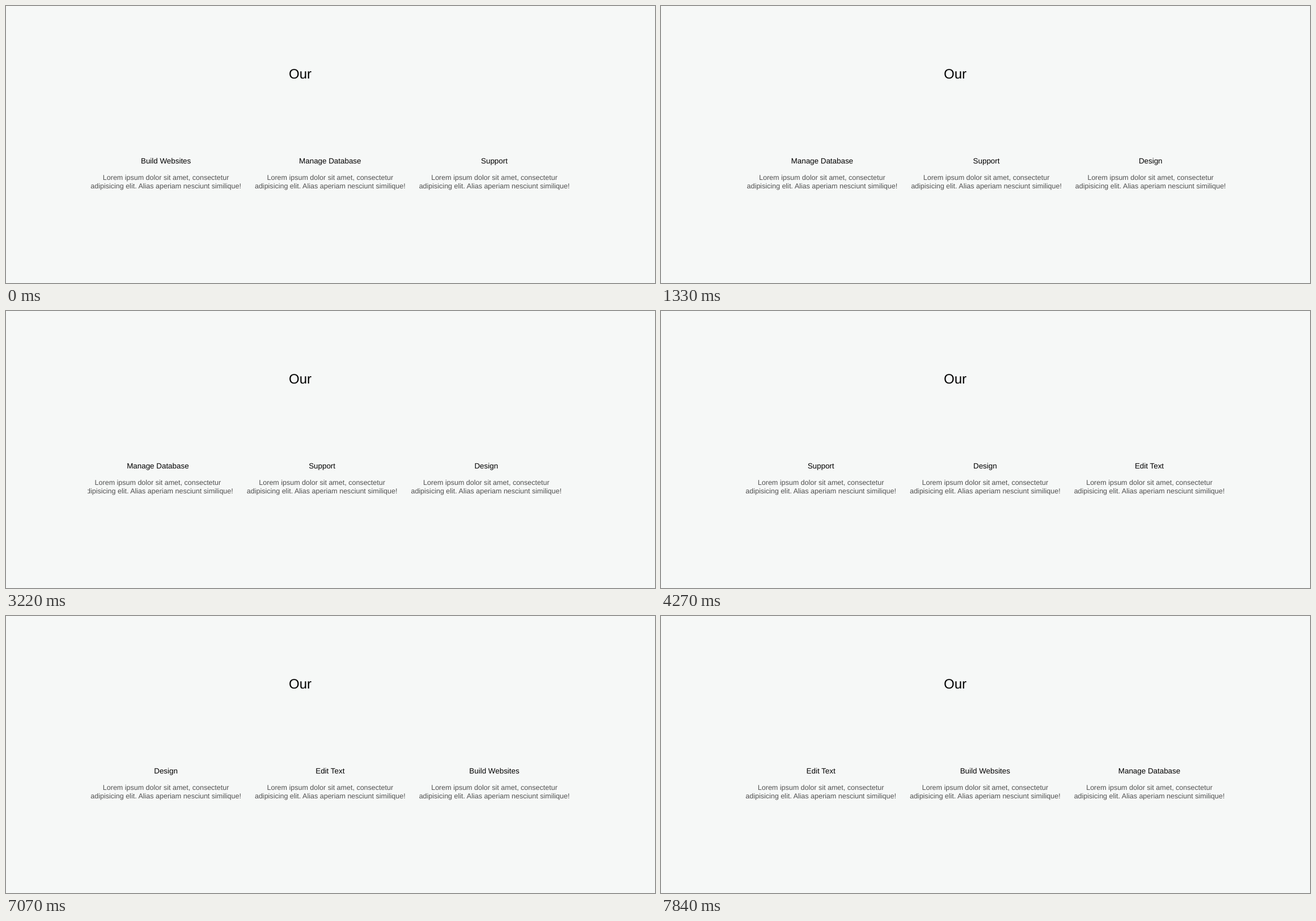
Animation of 1145x489 px, one loop 7.91 s. Source, as an HTML page:

```html
<!DOCTYPE html>
<html lang="en">
<head>
<meta charset="utf-8">
<title>Services carousel</title>
<style>
  html, body { margin: 0; width: 100%; height: 100%; overflow: hidden; background: #f6f8f7; }
  svg { display: block; }
  text { font-family: "Liberation Sans", Arial, sans-serif; text-rendering: geometricPrecision; }
  .heading { font-size: 24px; }
  .card { text-anchor: middle; }
  .title { font-size: 13.4px; }
  .body { font-size: 12.52px; fill: #505050; }
</style>
</head>
<body>
<svg width="1145" height="489" viewBox="0 0 1145 489">
  <clipPath id="viewport"><rect x="144" y="250" width="855" height="90"/></clipPath>
  <text class="heading" x="499" y="127.5">Our</text>
  <g clip-path="url(#viewport)"><g id="track"></g></g>
</svg>
<script>
const LOOP = 7910, TICK = 70;
const STEP = 289.7, FIRST_CENTER = 282.1;
const FIRST_SLIDE = 1101, PERIOD = 2102, DURATION = 259, SLIDES = 4;
const TITLES = ["Build Websites", "Manage Database", "Support", "Design", "Edit Text"];
const LINES = [
  "Lorem ipsum dolor sit amet, consectetur",
  "adipisicing elit. Alias aperiam nesciunt similique!"
];

const track = document.getElementById("track");

function addText(parent, className, y, content) {
  const text = document.createElementNS("http://www.w3.org/2000/svg", "text");
  text.setAttribute("class", className);
  text.setAttribute("y", y);
  text.textContent = content;
  parent.append(text);
}

for (let i = 0; i < SLIDES + 3; i++) {
  const card = document.createElementNS("http://www.w3.org/2000/svg", "g");
  card.setAttribute("class", "card");
  card.setAttribute("transform", `translate(${FIRST_CENTER + i * STEP} 0)`);
  addText(card, "title", 277.5, TITLES[i % TITLES.length]);
  LINES.forEach((line, row) => addText(card, "body", 307 + row * 15, line));
  track.append(card);
}

// CSS "ease": cubic-bezier(.25, .1, .25, 1), solved for x by bisection.
function ease(x) {
  if (x <= 0) return 0;
  if (x >= 1) return 1;
  const bezier = (a, b, t) => 3 * a * t * (1 - t) ** 2 + 3 * b * t * t * (1 - t) + t ** 3;
  let low = 0, high = 1;
  for (let i = 0; i < 24; i++) {
    const mid = (low + high) / 2;
    if (bezier(0.25, 0.25, mid) < x) low = mid; else high = mid;
  }
  return bezier(0.1, 1, low);
}

function draw(now) {
  const time = Math.floor((now % LOOP) / TICK) * TICK;
  let position = 0;
  for (let i = 0; i < SLIDES; i++) {
    position += ease((time - FIRST_SLIDE - i * PERIOD) / DURATION);
  }
  track.setAttribute("transform", `translate(${-position * STEP} 0)`);
}

const start = performance.now();
function frame() {
  draw(performance.now() - start);
  requestAnimationFrame(frame);
}
frame();
</script>
</body>
</html>
```
